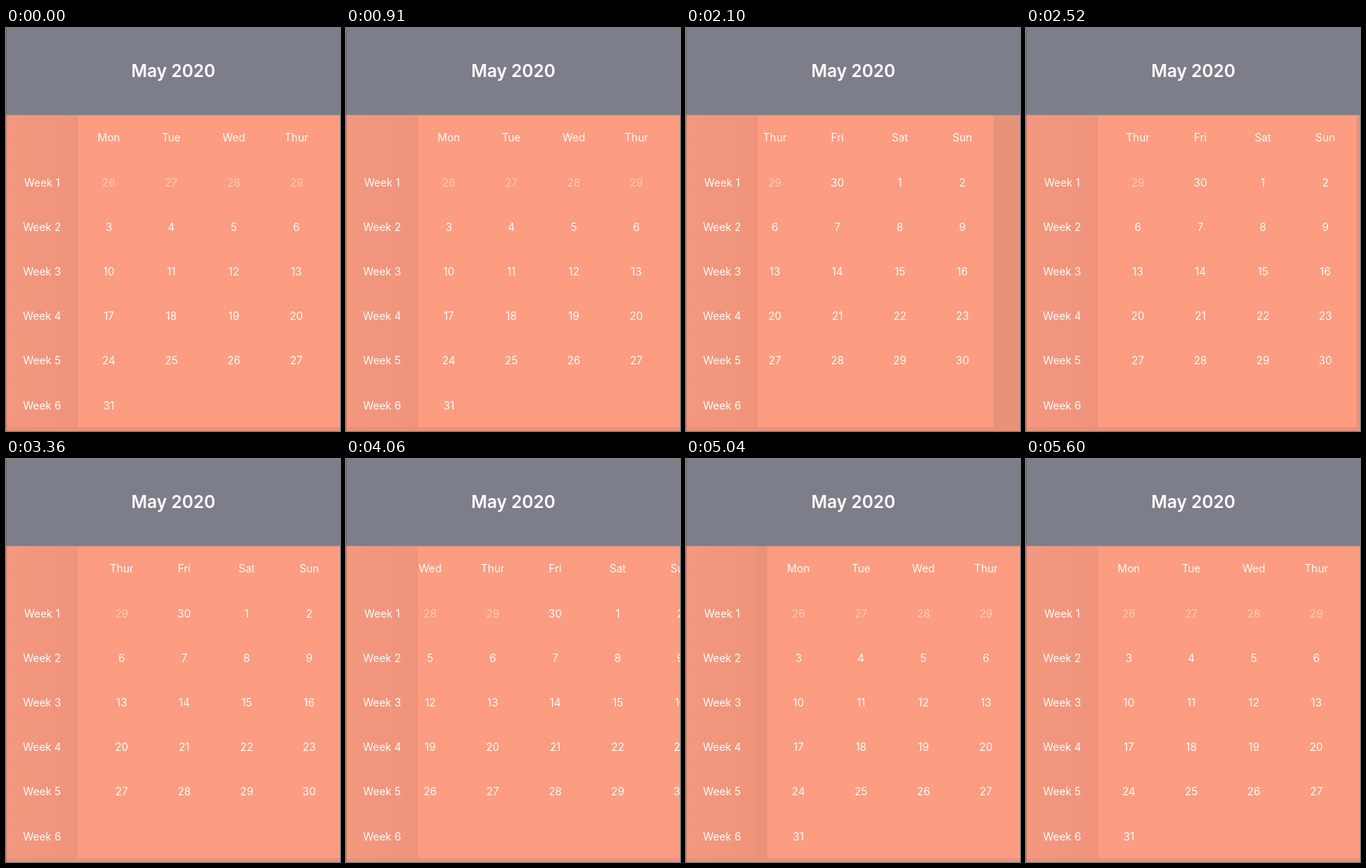
Animation of 436x526 px, one loop 5880 ms. Source, as an HTML page with a canvas:

```html
<!DOCTYPE html>
<html lang="en">
<head>
<meta charset="utf-8">
<title>Month calendar</title>
<style>
  html, body { margin: 0; width: 100%; height: 100%; overflow: hidden; background: #7c7f89; }
  canvas { display: block; width: 436px; height: 526px; }
</style>
</head>
<body>
<canvas id="stage"></canvas>
<script>
const W = 436, H = 526, LOOP = 5880, STEP = 70;
const HEAD = 113.5, SIDE = 93.5, COL = 81.6, ROW = 58.2, BOTTOM = 521;
const FIRST_X = 134.2, FIRST_Y = 143.3;
const DAYS = ['Mon', 'Tue', 'Wed', 'Thur', 'Fri', 'Sat', 'Sun'];
const FONT = 'Inter, "Liberation Sans", sans-serif';

// Scroll offset over time: drag, overshoot and spring back, each way.
const SCROLL = [
  [1310, 0], [1540, 35], [1820, 158], [2030, 250], [2100, 263], [2170, 264],
  [2310, 246], [2520, 233], [2870, 228],
  [3850, 228], [4060, 187.5], [4340, 92], [4550, 21.5], [4690, -22],
  [4780, -33], [4840, -33], [4970, -18], [5180, -5], [5460, 0]
];

const canvas = document.getElementById('stage');
const ctx = canvas.getContext('2d');
const dpr = window.devicePixelRatio || 1;
canvas.width = W * dpr;
canvas.height = H * dpr;
ctx.scale(dpr, dpr);

const slope = i => (SCROLL[i + 1][1] - SCROLL[i][1]) / (SCROLL[i + 1][0] - SCROLL[i][0]);

// Tangent of a monotone cubic through the scroll points.
function tangent(i) {
  if (i === 0 || i === SCROLL.length - 1) return 0;
  const a = slope(i - 1), b = slope(i);
  return a * b <= 0 ? 0 : 2 * a * b / (a + b);
}

function scrollAt(t) {
  const last = SCROLL.length - 1;
  if (t <= SCROLL[0][0] || t >= SCROLL[last][0]) return 0;
  let i = 0;
  while (t >= SCROLL[i + 1][0]) i++;
  const [t0, a] = SCROLL[i], [t1, b] = SCROLL[i + 1];
  const d = t1 - t0, u = (t - t0) / d, v = 1 - u;
  return a * (1 + 2 * u) * v * v + b * u * u * (3 - 2 * u)
    + d * u * v * (tangent(i) * v - tangent(i + 1) * u);
}

function rect(color, x, y, w, h) {
  ctx.fillStyle = color;
  ctx.fillRect(x, y, w, h);
}

function label(text, x, y, alpha = 0.96) {
  ctx.fillStyle = `rgba(255,255,255,${alpha})`;
  ctx.fillText(text, x, y + 5);
}

function drawGrid(offset) {
  ctx.save();
  ctx.beginPath();
  ctx.rect(SIDE, HEAD, W - SIDE, BOTTOM - HEAD);
  ctx.clip();
  rect('#fc9c80', SIDE - offset, HEAD, COL * 7, BOTTOM - HEAD);
  DAYS.forEach((day, col) => {
    const x = FIRST_X + col * COL - offset;
    label(day, x, FIRST_Y);
    for (let row = 0; row < 6; row++) {
      const n = row * 7 + col - 4;
      if (n > 31) continue;
      label(n > 0 ? n : n + 30, x, FIRST_Y + (row + 1) * ROW, n < 0 ? 0.48 : 0.96);
    }
  });
  ctx.restore();
}

function draw(t) {
  rect('#e8927a', 0, HEAD, W, H - HEAD);
  ctx.textAlign = 'center';
  ctx.font = `400 14px ${FONT}`;
  drawGrid(scrollAt(t));

  const side = ctx.createLinearGradient(0, 0, SIDE, 0);
  side.addColorStop(0, '#f3987e');
  side.addColorStop(1, '#ef947b');
  rect(side, 0, HEAD, SIDE, BOTTOM - HEAD);
  for (let i = 1; i < 7; i++) label('Week ' + i, 47, FIRST_Y + i * ROW);

  rect('#7c7f89', 0, 0, W, HEAD);
  ctx.font = `600 22.5px ${FONT}`;
  label('May 2020', 218.5, 59, 1);
  rect('rgba(60,50,55,0.3)', 0, 0, 1, H);
}

function tick(now) {
  draw(Math.floor(now % LOOP / STEP) * STEP);
  requestAnimationFrame(tick);
}
requestAnimationFrame(tick);
</script>
</body>
</html>
```
